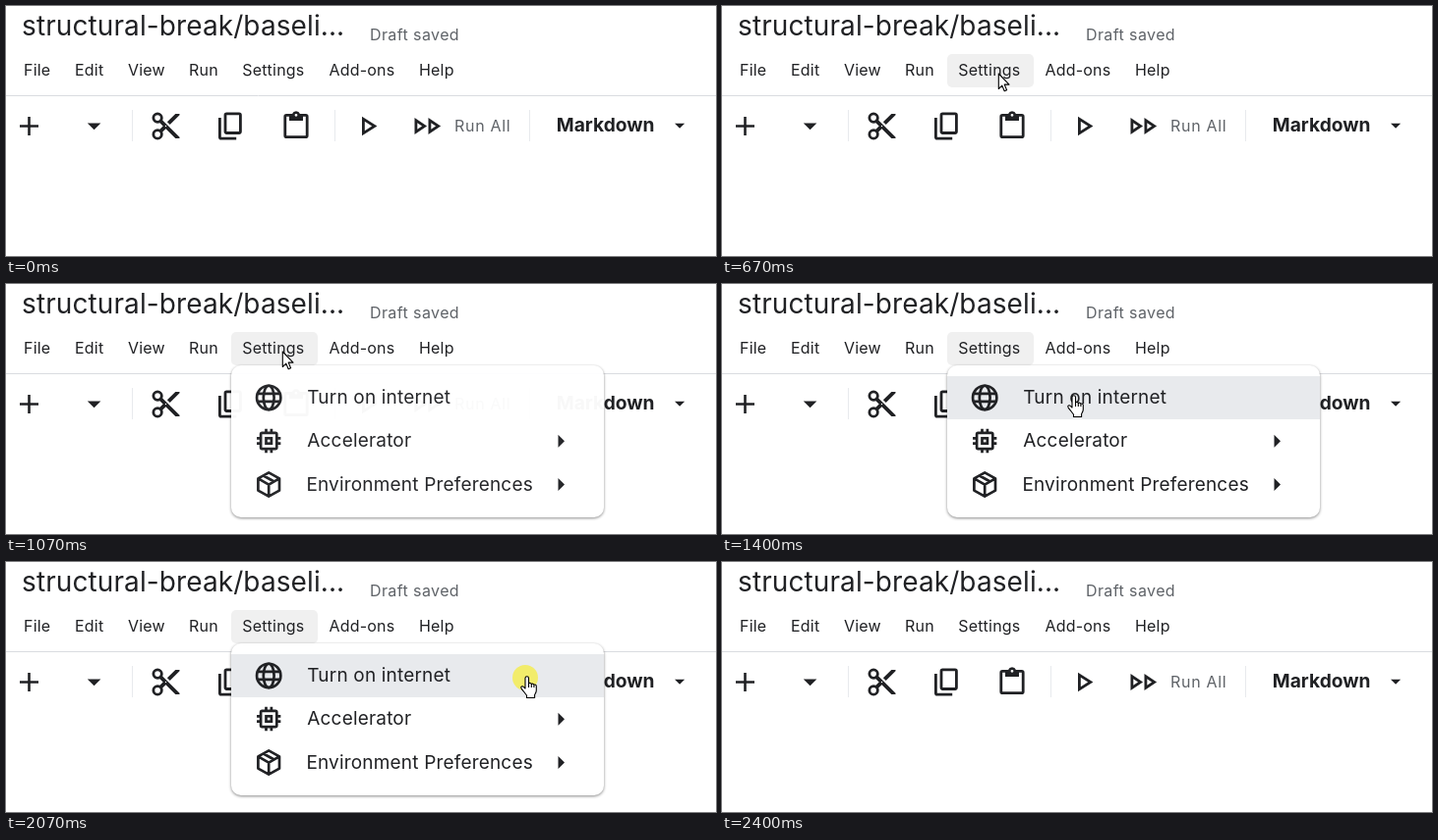
Animation, 722 px wide and 255 px high, one loop 3250 ms. Source, as an HTML page:

```html
<!DOCTYPE html>
<html lang="en">
<head>
<meta charset="utf-8">
<title>Settings menu</title>
<style>
html, body { margin: 0; width: 100%; height: 100%; overflow: hidden; background: #fff; }
svg { display: block; }
text { font: 16px Inter, Arial, sans-serif; font-optical-sizing: none; letter-spacing: .2px; fill: #202124; }
.title { font-size: 28px; letter-spacing: .1px; }
.draft { letter-spacing: .4px; fill: #5f6368; }
.all { letter-spacing: .7px; fill: #5f6368; }
.kind { font-size: 19.2px; font-weight: 700; letter-spacing: 0; }
.row { font-size: 19px; letter-spacing: .18px; }
.panel { fill: #fff; filter: drop-shadow(0 1px 1.5px #0007); }
.icon { fill: #202124; fill-rule: evenodd; }
.line { fill: none; stroke: #202124; stroke-width: 2; }
.pointer { fill: #fff; stroke: #000; stroke-width: 1.1; stroke-linejoin: round; }
</style>
</head>
<body>
<svg width="722" height="255" viewBox="0 0 722 255">
  <text class="title" x="16" y="30">structural-break/baseli...</text>
  <text class="draft" x="370" y="35">Draft saved</text>
  <rect id="hover" x="229" y="49" width="88" height="34" rx="5" fill="#f0f0f0"/>
  <g id="bar"></g>
  <path d="M0 91.5H722" stroke="#dadce0"/>
  <path d="M128.5 106V138M334.5 106V138M532.5 106V138" stroke="#e8eaed"/>

  <g class="icon">
    <path d="M22.2 113h2.6v8.2H33v2.6h-8.2v8.2h-2.6v-8.2H14v-2.6h8.2z"/>
    <path d="M82.8 119.4h13.6l-6.8 6.8zM680 119.7h10.2l-5.1 5z"/>
    <path transform="translate(145.7 105.7) scale(1.4)" d="M9.64 7.64c.23-.5.36-1.05.36-1.64a4 4 0 1 0-4 4c.59 0 1.14-.13 1.64-.36L10 12l-2.36 2.36C7.14 14.13 6.59 14 6 14a4 4 0 1 0 4 4c0-.59-.13-1.14-.36-1.64L12 14l7 7h3v-1zM6 8a2 2 0 1 1 0-4 2 2 0 0 1 0 4zm0 12a2 2 0 1 1 0-4 2 2 0 0 1 0 4zm6-7.5a.5.5 0 1 1 0-1 .5.5 0 0 1 0 1zM19 3l-6 6 2 2 7-7V3z"/>
    <path transform="translate(211.8 105.7) scale(1.4)" d="M9 18a2 2 0 0 1-2-2V4a2 2 0 0 1 2-2h9a2 2 0 0 1 2 2v12a2 2 0 0 1-2 2zm0-2h9V4H9zm-4 6a2 2 0 0 1-2-2V6h2v14h11v2z"/>
    <path transform="translate(278.2 105.7) scale(1.4)" d="M19 3h-4.18a3 3 0 0 0-5.64 0H5a2 2 0 0 0-2 2v14a2 2 0 0 0 2 2h14a2 2 0 0 0 2-2V5a2 2 0 0 0-2-2zm-7 0a1 1 0 1 1 0 2 1 1 0 0 1 0-2zm7 16H5V5h2v3h10V5h2z"/>
    <path transform="translate(350.8 105.7) scale(1.4)" d="M8 19V5l11 7zm2-3.65L15.25 12 10 8.65z"/>
    <path transform="translate(412 105.7) scale(1.4)" d="M2.5 18V6l9 6zm2-3.75L7.9 12 4.5 9.75zM12.5 18V6l9 6zm2-3.75L17.9 12l-3.4-2.25z"/>
  </g>
  <text class="all" x="456" y="128">Run All</text>
  <text class="kind" x="559.8" y="128">Markdown</text>

  <g id="menu">
    <rect class="panel" x="229" y="83" width="379" height="155" rx="10"/>
    <rect id="mark" x="229" y="94" width="379" height="44" fill="#e8eaed"/>
    <rect id="shade" x="348.5" y="94" width="259.5" height="44" fill="#b2b2b2"/>
    <g class="line">
      <g transform="translate(251 99.7) scale(1.35)">
        <circle cx="12" cy="12" r="9"/><ellipse cx="12" cy="12" rx="4" ry="9"/><path d="M3.5 9h17M3.5 15h17"/>
      </g>
      <g transform="translate(251 143.8) scale(1.35)">
        <rect x="6" y="6" width="12" height="12" rx="1"/><rect x="10" y="10" width="4" height="4"/>
        <path d="M10 3v3M14 3v3M10 18v3M14 18v3M3 10h3M3 14h3M18 10h3M18 14h3"/>
      </g>
      <g transform="translate(251 188.3) scale(1.35)" stroke-linejoin="round">
        <path d="M12 3l8 4.5v9L12 21l-8-4.5v-9zM4 7.5l8 4.6 8-4.6M12 12v9M8 5.3l8 4.5"/>
      </g>
    </g>
    <text class="row" id="net" x="306.3" y="122"></text>
    <text class="row" x="306.3" y="166">Accelerator</text>
    <text class="row" x="305.4" y="211">Environment Preferences</text>
    <path class="icon" d="M561.5 153.7l6.5 6.5-6.5 6.5zM561.5 198l6.5 6.5-6.5 6.5z"/>
  </g>

  <g id="cursor">
    <circle id="click" r="13" cx="-1" cy="1" fill="#f3ec5c" opacity=".9"/>
    <path class="pointer" id="arrow" d="M.3 .5V16L3.8 12.6 6.2 18.2 8.6 17.2 6.2 11.6H11z"/>
    <g class="pointer" id="hand" transform="translate(-6 -1)">
      <path d="M5 13V2.5a1.75 1.75 0 0 1 3.5 0V8a1.6 1.6 0 0 1 2.8.6 1.6 1.6 0 0 1 2.6.7 1.5 1.5 0 0 1 2.4 1.2V15c0 2-1.2 3.5-1.7 4.5v3H6.5V20C5 18 3 15.5 1 12.8c-.9-1.5 1-2.7 2.3-1.4z"/>
      <path d="M8.5 8v4M11.3 8.6V12M13.9 9.3V12" fill="none"/>
    </g>
  </g>
</svg>
<script>
const LOOP = 3250, TICK = 200 / 3;
const $ = id => document.getElementById(id);

$('bar').innerHTML = [['File', 18], ['Edit', 70], ['View', 124], ['Run', 186],
  ['Settings', 240.2], ['Add-ons', 328.5], ['Help', 420]]
  .map(([word, x]) => `<text x="${x}" y="71">${word}</text>`).join('');

// Keys: tick, then values
const path = [[3, 585, 240], [5, 490, 195], [7, 370, 130], [9, 290, 77], [10, 281, 68.5],
  [18, 281, 68.5], [19, 294, 80], [21, 357, 114], [23, 450, 122], [25, 529, 117],
  [31, 529, 117], [34, 637, 146]];
// Opacity, scale x, scale y
const grow = [[12, 0, .75, .56], [13, .25, .87, .78], [14, .6, .95, .91], [15, .87, .99, .98],
  [16, .97, 1, 1], [18, .97, 1, 1], [19, 1, 1, 1], [32, 1, 1, 1], [33, .7, 1, 1],
  [34, .3, .987, .98], [35, .1, .95, .92], [36, 0, .9, .85]];

function at(keys, n) {
  const i = keys.findIndex(k => k[0] >= n);
  if (i < 0) return keys.at(-1).slice(1);
  if (!i) return keys[0].slice(1);
  const a = keys[i - 1], b = keys[i], p = (n - a[0]) / (b[0] - a[0]);
  return a.slice(1).map((v, j) => v + (b[j + 1] - v) * p);
}

const show = (id, on) => $(id).style.display = on ? '' : 'none';

function draw() {
  // The picture advances 15 times a second
  const n = Math.floor((performance.now() % LOOP + 4) / TICK);
  const [x, y] = at(path, n), [alpha, sx, sy] = at(grow, n);
  $('cursor').setAttribute('transform', `translate(${x} ${y})`);
  $('menu').setAttribute('transform', `translate(229 83) scale(${sx} ${sy}) translate(-229 -83)`);
  $('menu').setAttribute('opacity', alpha);
  $('net').textContent = `Turn ${n < 32 ? 'on' : 'off'} internet`;
  show('menu', alpha > 0);
  show('hover', n >= 9 && n < 33);
  show('mark', n >= 20);
  show('shade', n === 34);
  show('cursor', n >= 3 && n < 36);
  show('arrow', n < 20);
  show('hand', n >= 20);
  show('click', n === 12 || n === 13 || n === 31 || n === 32);
  requestAnimationFrame(draw);
}
draw();
</script>
</body>
</html>
```
